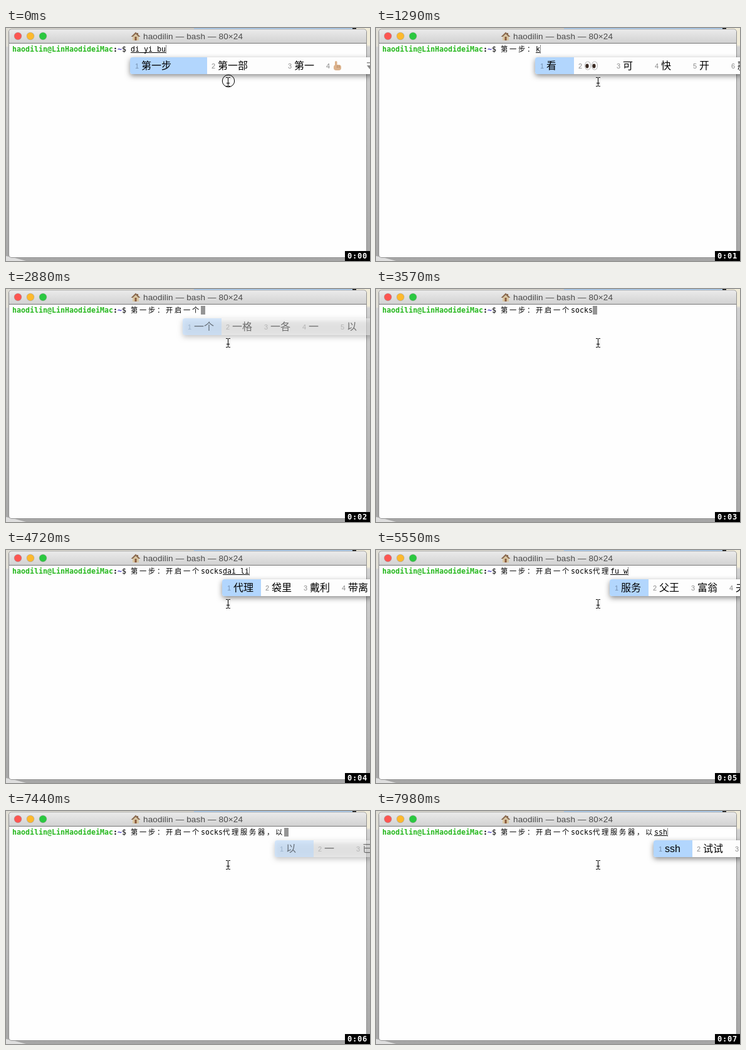
Animation, 581 px wide and 374 px high, one loop 8 s. Source, as an HTML page with a canvas:

```html
<!DOCTYPE html>
<html lang="zh-CN">
<meta charset="utf-8">
<style>
  html, body { margin: 0; width: 581px; height: 374px; overflow: hidden; }
  canvas { display: block; }
</style>
<canvas id="stage" width="581" height="374"></canvas>
<script>
const ctx = document.getElementById('stage').getContext('2d');
const LOOP = 8000, CELL = 7, TEXT_X = 199;
const MONO = '11.63px "DejaVu Sans Mono", monospace';
const HAN = '11.3px "Noto Sans CJK SC", "Noto Sans CJK", sans-serif';
const UI = '"Liberation Sans", "Noto Sans CJK SC", "Noto Sans CJK", sans-serif';

// start time, committed text, pinyin being typed, candidates ('~' = panel fading out)
const A = '第一步', B = A + '：', C = B + '开启', D = C + '一个', E = D + 'socks',
      F = E + '代理', G = F + '服务器', H = G + '，', I = H + '以';
const steps = [
  [0, '', 'di yi bu', '第一步 第一部 第一 @hand'],
  [150, A, '', '~'], [300, A, ''], [900, B, ''],
  [1290, B, 'k', '看 @eyes 可 快 开 款'],
  [1440, B, 'kai', '开 凯 楷 慨 揩 铠'],
  [1590, B, 'kai q', '开启 开枪 开球 开 凯 楷'],
  [1740, B, 'kai qi', '开启 开气 开 凯 楷 慨'],
  [2040, C, '', '~'], [2140, C, ''],
  [2440, C, 'yi', '一 @one 以 已 亿'],
  [2580, C, 'yi g', '一个 一共 一各 一 以'],
  [2720, C, 'yi ge', '一个 一格 一各 一 以'],
  [2860, D, '', '~'],
  [3000, D, 's', '是 说 上 三 时'],
  [3140, D, 'soc', 'soc 搜 所 四 色'],
  [3280, D, 'socks', 'socks 搜 所 四 色'],
  [3420, E, '', '~'], [3570, E, ''],
  [4170, E, 'd', '的 都 到 大'],
  [4310, E, 'da', '大 打 达 答'],
  [4450, E, 'dai', '带 代 待 袋'],
  [4590, E, 'dai l', '带来 带了 代理 带'],
  [4720, E, 'dai li', '代理 袋里 戴利 带离'],
  [4860, F, '', '~'], [5010, F, ''],
  [5310, F, 'f', '发 分 放 非'],
  [5440, F, 'fu w', '服务 父王 富翁 夫'],
  [5570, F, 'fu wu', '服务 服物 附物 夫'],
  [5700, F, 'fu wu qi', '服务器 服务 夫 父'],
  [6000, G, '', '~'], [6140, G, ''], [6440, H, ''],
  [6990, H, 'y', '有 一 要'], [7140, H, 'yi', '以 一 已'],
  [7440, I, '', '~'], [7540, I, ''],
  [7690, I, 's', '是 说 上'], [7840, I, 'ss', '试试 实施 时'],
  [7980, I, 'ssh', 'ssh 试试 是']
];
const clockTicks = [1000, 2140, 3140, 4170, 5310, 6540, 7540];

function rect(x, y, w, h, color) {
  ctx.fillStyle = color;
  ctx.fillRect(x, y, w, h);
}
function round(x, y, w, h, r, color) {
  ctx.beginPath();
  ctx.roundRect(x, y, w, h, r);
  ctx.fillStyle = color;
  ctx.fill();
}
function oval(x, y, rx, ry, color) {
  ctx.beginPath();
  ctx.ellipse(x, y, rx, ry, 0, 0, 7);
  ctx.fillStyle = color;
  ctx.fill();
}
function poly(color, ...points) {
  ctx.beginPath();
  points.forEach(p => ctx.lineTo(...p));
  ctx.fillStyle = color;
  ctx.fill();
}
function label(str, x, y, font, color = '#000') {
  ctx.font = font;
  ctx.fillStyle = color;
  ctx.fillText(str, x, y);
}
function fade(y0, y1, from, to) {
  const g = ctx.createLinearGradient(0, y0, 0, y1);
  g.addColorStop(0, from);
  g.addColorStop(1, to);
  return g;
}

// Grid text: Latin takes one cell, Chinese two. Returns the end position.
function gridText(str, x, color, weight = '') {
  for (const ch of str) {
    const wide = ch > '\u2000';
    label(ch, x, 38, weight + (wide ? HAN : MONO), color);
    x += wide ? 2 * CELL : CELL;
  }
  return x;
}

const icons = {
  eyes(x) {
    for (const cx of [x + 5, x + 16]) {
      oval(cx, 60.5, 5, 7, '#aaa');
      oval(cx, 60.5, 4.2, 6.2, '#fff');
      oval(cx - 1, 61, 2.6, 3.4, '#3a2a22');
    }
  },
  one(x) {
    round(x + 1, 52, 17, 17, 3, fade(52, 69, '#7199bd', '#41688f'));
    label('1', x + 6, 65, 'bold 12px ' + UI, '#fff');
  },
  hand(x) {
    round(x + 4, 53, 3.5, 10, 1.7, '#dcb28c');
    round(x + 2, 59, 12, 9, 4, '#dcb28c');
    rect(x + 7.5, 60, .8, 4, '#a97c58');
    rect(x + 10.5, 60, .8, 4, '#a97c58');
  }
};

function panel(x, list, alpha) {
  ctx.save();
  ctx.globalAlpha = alpha;
  ctx.shadowColor = 'rgba(0,0,0,.45)';
  ctx.shadowBlur = 8;
  ctx.shadowOffsetY = 3;
  round(x - 1, 47, 620, 27, 4, '#fdfdfd');
  ctx.shadowColor = 'transparent';
  list.split(' ').forEach((word, i) => {
    const icon = icons[word.slice(1)];
    ctx.font = '16px ' + UI;
    const width = !icon && ctx.measureText(word).width > 44 ? 122 : 61;
    if (!i) round(x - 1, 47, width + 1, 27, [4, 0, 0, 4], '#b2d6fd');
    label(i + 1, x + 7, 65, '11px ' + UI, i ? '#8a8a8a' : '#7490b0');
    if (icon) icon(x + 17);
    else label(word, x + 17, 66, '16px ' + UI);
    x += width;
  });
  rect(x + 11, 55, 9, 1.5, '#888');
  poly('#888', [x + 11, 60], [x + 20, 60], [x + 15.5, 66]);
  ctx.restore();
}

function desktop() {
  rect(0, 0, 581, 374, fade(30, 374, '#d2d2d2', '#a6a6a6'));
  rect(0, 0, 581, 30, '#dfddd5');
  rect(300, 0, 255, 3, '#b0d2f6');
  rect(553, 0, 6, 2, '#111');
  rect(559, 0, 22, 28, '#f1ecd9');
  poly('#dedede', [0, 366], [14, 369], [32, 374], [0, 374]);

  round(4, 1.5, 572, 367.5, 5, '#8f8f8f');
  round(5, 2.5, 570, 365.5, 4, '#fefefe');
  round(5, 2.5, 570, 21.5, [4, 4, 0, 0], fade(2, 24, '#ebebeb', '#d2d2d2'));
  rect(5, 24, 570, 1, '#777');
  ['#fc5652', '#fdb92d', '#2bc840'].forEach((color, i) => {
    oval(19 + 20 * i, 13, 6.2, 6.2, 'rgba(0,0,0,.25)');
    oval(19 + 20 * i, 13, 5.7, 5.7, color);
  });

  rect(202, 12, 10, 8, '#d9c7a3');
  rect(209, 8, 2, 4, '#8d6a4c');
  poly('#8a6a50', [207, 6.5], [214.5, 14], [199.5, 14]);
  poly('#d9c7a3', [207, 9.5], [211.5, 14], [202.5, 14]);
  rect(205.5, 14, 3, 6, '#8a5a3c');
  ctx.letterSpacing = '0.15px';
  label('haodilin — bash — 80×24', 219, 18, '13.5px ' + UI, '#4a4a4a');
  ctx.letterSpacing = '0px';
}

function pointer(clicked) {
  ctx.lineWidth = 1;
  ctx.strokeStyle = '#000';
  if (clicked) {
    ctx.beginPath();
    ctx.arc(355, 85, 9.7, 0, 7);
    ctx.stroke();
  }
  rect(354, 80, 1, 13, '#000');
  for (const y of [79, 93]) {
    rect(351, y, 3, 1, '#000');
    rect(355, y, 3, 1, '#000');
  }
  rect(352, 88, 5, 1, '#000');
}

function draw(t) {
  const index = steps.findLastIndex(s => s[0] <= t);
  const [, text, pinyin, list] = steps[index];
  desktop();
  let x = gridText('haodilin@LinHaodideiMac', 10, '#26b81e', 'bold ');
  x = gridText(':', x, '#000', 'bold ');
  x = gridText('~', x, '#4a3cc0', 'bold ');
  gridText('$', x, '#000');

  const start = gridText(text, TEXT_X, '#000');
  const end = gridText(pinyin, start, '#000');
  if (pinyin) {
    rect(start, 39, end - start, 1, '#000');
    rect(end, 27, 1, 14, '#888');
    panel(start, list, 1);
  } else {
    rect(end, 27, 7, 14, '#959595');
    if (list) {
      const [, oldText, , oldList] = steps[index - 1];
      const left = [...oldText].reduce((n, ch) => n + (ch > '\u2000' ? 14 : 7), TEXT_X);
      panel(left, oldList, .5);
    }
  }
  pointer(t < 150);

  rect(541, 358, 40, 16, '#000');
  ctx.letterSpacing = '0.8px';
  label('0:0' + clockTicks.filter(tick => tick <= t).length, 545, 370,
    'bold 12px "DejaVu Sans Mono", monospace', '#fff');
  ctx.letterSpacing = '0px';
}

const began = performance.now();
function frame() {
  draw((performance.now() - began) % LOOP);
  requestAnimationFrame(frame);
}
frame();
</script>
</html>
```
